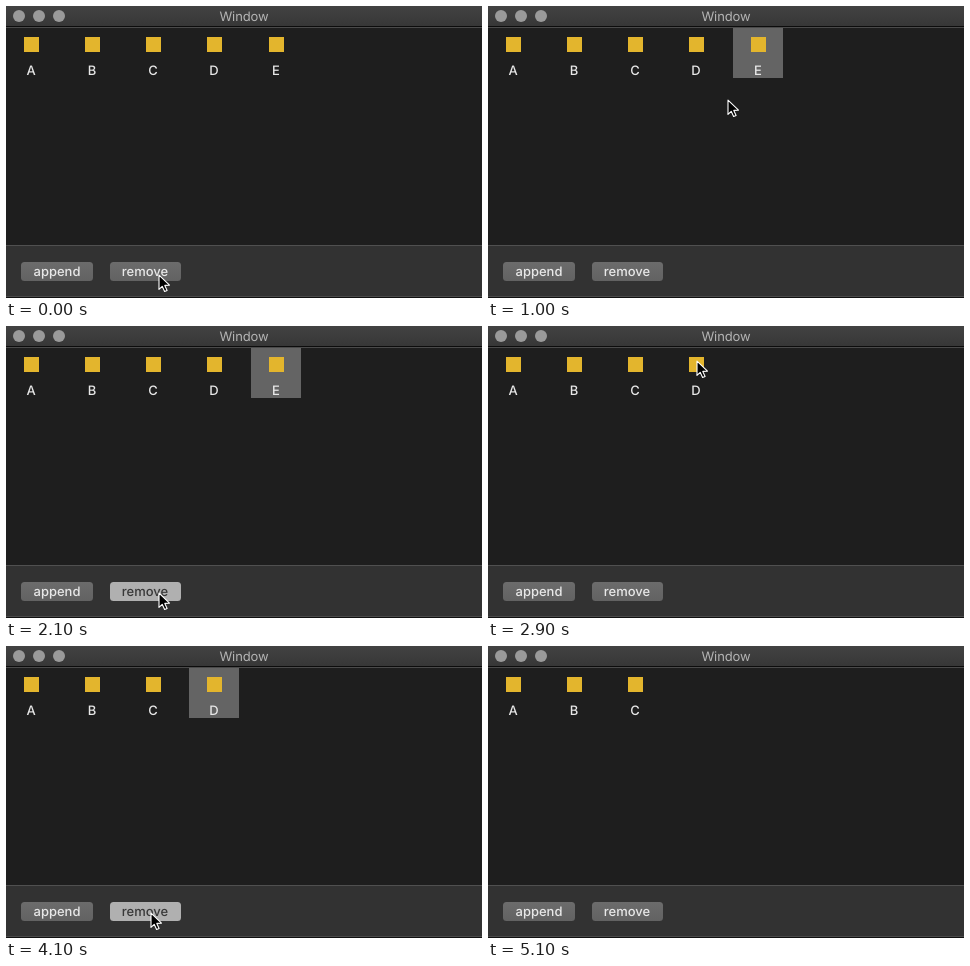
Recreate the animation shown at these times as an HTML page. Size 476 px wide and 292 px high, loop 6.2 s.

```html
<!DOCTYPE html>
<html lang="en">
<head>
<meta charset="utf-8">
<title>Window</title>
<style>
  html, body { margin: 0; width: 100%; height: 100%; overflow: hidden; background: #1e1e1e; }
  svg { display: block; width: 476px; height: 292px; }
  text {
    font: 500 13px Inter, Roboto, sans-serif; text-anchor: middle; fill: #e8e8e8;
    text-rendering: geometricPrecision;
  }
  .title { font-weight: 400; letter-spacing: -.1px; fill: #b4b4b4; }
  .button rect { fill: url(#face); }
  .button.pressed rect { fill: #b0b0b0; }
  .button.pressed text { fill: #383838; }
  .back { fill: none; }
  .selected .back { fill: #646464; }
  .gone { display: none; }
</style>
</head>
<body>
<svg viewBox="0 0 476 292">
  <defs>
    <linearGradient id="bar" x2="0" y2="1">
      <stop stop-color="#424242"/><stop offset="1" stop-color="#373737"/>
    </linearGradient>
    <linearGradient id="face" x2="0" y2="1">
      <stop stop-color="#6c6c6c"/><stop offset="1" stop-color="#626262"/>
    </linearGradient>
  </defs>

  <rect width="476" height="292" fill="#1e1e1e"/>
  <rect width="476" height="20" fill="url(#bar)"/>
  <rect y="20" width="476" height="1" fill="#0c0c0c"/>
  <rect y="21" width="476" height="1" fill="#4a4a4a"/>
  <g fill="#9a9a9a">
    <circle cx="13" cy="10" r="6"/><circle cx="33" cy="10" r="6"/><circle cx="53" cy="10" r="6"/>
  </g>
  <text class="title" x="238" y="15">Window</text>

  <g id="items"></g>

  <rect y="239" width="476" height="53" fill="#323232"/>
  <rect y="239" width="476" height="1" fill="#505050"/>
  <rect y="290" width="476" height="1" fill="#4a4a4a"/>
  <rect y="291" width="476" height="1" fill="#101010"/>

  <g class="button">
    <rect x="15" y="256" width="72" height="19" rx="3.5"/>
    <text x="51" y="270">append</text>
  </g>
  <g class="button" id="remove">
    <rect x="104" y="256" width="71" height="19" rx="3.5"/>
    <text x="139" y="270">remove</text>
  </g>

  <path id="cursor" d="M1 1.2V15.4L4.2 12.3 6.6 17.5 9.1 16.4 6.8 11.4 11.5 11.1Z"
        fill="#000" stroke="#fff" stroke-width="1.1" stroke-linejoin="round"/>
</svg>

<script>
  const LOOP = 6200, TICK = 100, PRESS = 100;
  const HOME = { x: 152, y: 268 };

  // Pointer moves; bend bows the way sideways
  const moves = [
    { from: 100, to: 600, x: 263, y: 42, bend: 90 },
    { from: 800, to: 1400, x: 170, y: 237 },
    { from: 1400, to: 1800, x: 152, y: 266 },
    { from: 2500, to: 2900, x: 208, y: 34 },
    { from: 3200, to: 3800, x: 145, y: 254 },
    { from: 3800, to: 4000, x: 144, y: 266 },
    { from: 4200, to: 4500, x: 221, y: 281 },
    { from: 4500, to: 4700, x: 248, y: 282 },
    { from: 4900, to: 5100, x: 282, y: 294 }
  ];
  // When an item is selected, and when the button removes it
  const removals = [
    { item: 4, select: 800, press: 2100 },
    { item: 3, select: 3200, press: 4100 }
  ];

  const items = document.getElementById("items");
  const cursor = document.getElementById("cursor");
  const remove = document.getElementById("remove");
  const clamp = v => Math.min(1, Math.max(0, v));
  const ease = p => p * p * (3 - 2 * p);

  const cells = [..."ABCDE"].map((name, i) => {
    const x = Math.floor(i * 61.25);
    items.insertAdjacentHTML("beforeend", `<g transform="translate(${x})">
      <rect class="back" y="22" width="50" height="50"/>
      <rect x="18" y="31" width="15" height="15" fill="#e3b52d"/>
      <text x="25" y="69">${name}</text></g>`);
    return items.lastElementChild;
  });

  function pointer(t) {
    let { x, y } = HOME;
    for (const m of moves) {
      const e = ease(clamp((t - m.from) / (m.to - m.from)));
      x += (m.x - x) * e + (m.bend || 0) * Math.sin(Math.PI * e);
      y += (m.y - y) * e;
    }
    return [Math.round(x), Math.round(y)];
  }

  function draw(time) {
    const t = Math.floor(time % LOOP / TICK) * TICK;
    cursor.setAttribute("transform", `translate(${pointer(t)})`);
    for (const { item, select, press } of removals) {
      cells[item].classList.toggle("selected", t >= select);
      cells[item].classList.toggle("gone", t >= press + PRESS);
    }
    const down = removals.some(({ press }) => t >= press && t < press + PRESS);
    remove.classList.toggle("pressed", down);
  }

  const start = performance.now();
  function frame() {
    draw(performance.now() - start);
    requestAnimationFrame(frame);
  }
  frame();
</script>
</body>
</html>
```
